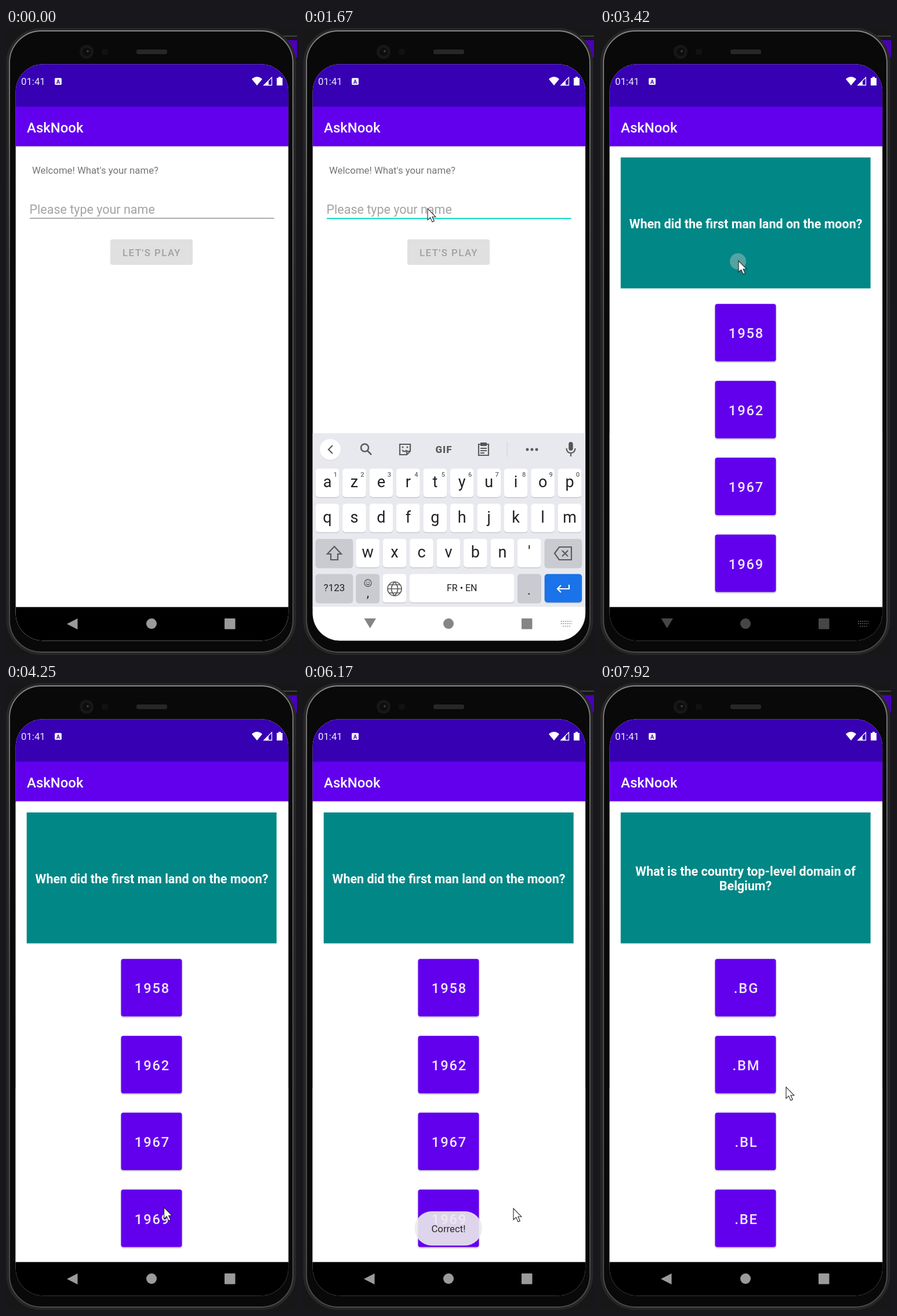
Write an HTML page that moves like this. It is 502 px wide and 1080 px high and loops after 8 s.

```html
<!DOCTYPE html>
<html lang="en">
<head>
<meta charset="utf-8">
<title>Quiz app demo</title>
<style>
  html, body { margin: 0; width: 100%; height: 100%; overflow: hidden; background: #161616; }
  svg { display: block; width: 502px; height: 1080px; font-family: Roboto, sans-serif; }
  .mid { text-anchor: middle; }
  .medium { font-weight: 500; }
  .bold { font-weight: 700; }
  .line { fill: none; stroke: #5c5c5c; stroke-width: 2.2; }
</style>
</head>
<body>
<svg id="stage" viewBox="0 0 502 1080" xmlns="http://www.w3.org/2000/svg"></svg>
<script>
const PURPLE = '#6200ee', TEAL = '#1adcc8', KEY_GRAY = '#cacad1';
const MOON = ['1958', '1962', '1967', '1969'];
const DOMAINS = ['.BG', '.BM', '.BL', '.BE'];
const NAME = 'Wilu', TYPED_AT = [2080, 2250, 2330, 2500];

const rect = (x, y, w, h, fill, rx = 0, more = '') =>
  `<rect x="${x}" y="${y}" width="${w}" height="${h}" rx="${rx}" fill="${fill}" ${more}/>`;
const circle = (x, y, r, fill, more = '') => `<circle cx="${x}" cy="${y}" r="${r}" fill="${fill}" ${more}/>`;
const path = (d, fill, more = '') => `<path d="${d}" fill="${fill}" ${more}/>`;
const line = (d, more = '') => `<path class="line" d="${d}" ${more}/>`;
const text = (x, y, str, size, fill, cls = '', more = '') =>
  `<text x="${x}" y="${y}" font-size="${size}" fill="${fill}" class="${cls}" ${more}>${str}</text>`;
const group = (id, ...parts) => `<g id="${id}">${parts.join('')}</g>`;

function phoneBody() {
  return rect(0, 0, 502, 1080, '#171717') + rect(440, 13, 62, 2, '#444') + rect(470, 21, 32, 30, '#4a00b8') +
    rect(3, 2.5, 495, 1075, '#0a0a0a', 58, 'stroke="#262626" stroke-width="5"') +
    rect(6, 5, 489, 1070, '#090909', 55, 'stroke="url(#rim)" stroke-width="1.8"') +
    circle(139, 41, 12, '#171717') + circle(139, 41, 7, '#0d0d0e') + circle(141, 40, 2, '#3a3a3a') +
    rect(165, 36, 11, 10, '#111', 3) + rect(225, 37, 53, 8, '#272727', 3);
}

function appBars() {
  return rect(16, 62, 472, 74, '#3700b3') +
    text(26, 98.3, '01:41', 16.75, '#f0eaf8') +
    rect(84, 86, 12, 12, '#f0eaf8', 2) + text(90, 95.5, 'A', 9, '#3700b3', 'mid bold') +
    path('M424 88Q433 80 442 88L433 99Z', '#fff') +
    path('M445 98.5L458.5 85V98.5Z', 'none', 'stroke="#fff" stroke-width="1.3"') + path('M445 99L453 91V99Z', '#fff') +
    path('M467 86H470V84H474V86H477V99H467Z', '#fff') +
    rect(16, 135.6, 472, 68.1, PURPLE) + text(36, 180, 'AskNook', 23.9, '#fff', 'medium') +
    rect(16, 203.7, 472, 1.5, '#00000012');
}

function welcomePage() {
  return text(45, 251, "Welcome! What's your name?", 16.75, '#757575') +
    text(40.5, 319.5, 'Please type your name', 21.5, '#a3a3a3', '', 'id="hint"') +
    text(40.5, 319.5, '', 21.5, '#222', '', 'id="typed"') +
    rect(41, 321.5, 0, 1.3, '#333', 0, 'id="composing"') + rect(86, 296, 2.5, 29, TEAL, 0, 'id="caret"') +
    rect(41, 327, 421.5, 1.3, '#858585', 0, 'id="underline"') +
    rect(180, 364, 142, 44, '#e0e0e0', 4, 'id="play"') +
    text(251.5, 392.5, "LET'S PLAY", 16.75, '#a0a0a0', 'mid medium', 'id="playLabel" letter-spacing="1.5"');
}

function keyboard() {
  const key = (x, y, label, w = 40.6, fill = '#fff', size = 27) =>
    rect(x, y + 1.5, w, 49, '#c9cad0', 5) + rect(x, y, w, 49, fill, 5) +
    text(x + w / 2, y + 24.5 + size * .29, label, size, '#202124', 'mid');
  const row = (chars, x, y) => [...chars].map((c, i) => key(x + i * 46.45, y, c)).join('');
  const digits = [...'1234567890'].map((d, i) => text(56 + i * 46.45, 772.5, d, 11, '#666', 'mid medium')).join('');
  const keys = row('azertyuiop', 21.7, 759) + digits + row('qsdfghjklm', 21.7, 819.5) + row("wxcvbn'", 91.3, 880) +
    key(21.7, 880, '', 64.5, KEY_GRAY) + key(416.7, 880, '', 64.5, KEY_GRAY) +
    key(21.7, 940.5, '?123', 64.5, KEY_GRAY, 17) + key(91.3, 940.5, '', 40.6, KEY_GRAY) + key(137.5, 940.5, '') +
    key(184, 940.5, 'FR • EN', 180.5, '#fff', 16) + key(370, 940.5, '', 41, KEY_GRAY) + key(416.7, 940.5, '', 64.5, '#1a73e8') +
    text(390, 976, '.', 22, '#222', 'mid') + text(112, 980, ',', 22, '#222', 'mid');
  const icons = line('M54 893L66 906H60V916H48V906H42Z') +
    line('M434 905L442 894H463V916H442ZM447 900L457 910M457 900L447 910') +
    line('M146 966a12 12 0 1 0 24 0a12 12 0 1 0 -24 0H170M158 954Q147 966 158 978Q169 966 158 954M149 959H167M149 973H167', 'style="stroke-width:1.7"') +
    line('M106 956a6 6 0 1 0 12 0a6 6 0 1 0 -12 0M109 957Q112 961 115 957', 'style="stroke-width:1.3"') +
    circle(110, 954.5, .9, '#555') + circle(114, 954.5, .9, '#555') +
    line('M459 959V966H439M445 960L439 966L445 972', 'style="stroke:#fff"');
  const mic = rect(458.3, 713, 7.4, 15, '#555', 3.7) + line('M454.5 724Q455 732 462 732Q469 732 469.5 724M462 732V738');
  const tools = line('M51 719L44 726L51 733') +
    line('M100 723a6.5 6.5 0 1 0 13 0a6.5 6.5 0 1 0 -13 0M111 728L118 735', 'style="stroke-width:2.6"') +
    line('M167 717H185V729L179 735H167ZM185 729H179V735M171 727Q175 732 179 727') +
    circle(172, 722, 1.5, '#555') + circle(180, 722, 1.5, '#555') +
    text(243, 732, 'GIF', 17, '#5c5c5c', 'mid', 'font-weight="900" letter-spacing="1"') +
    line('M303 717H320V736H303ZM306 724H317M306 728H317M306 732H313') + rect(306, 714, 11, 6, '#555', 1) +
    rect(351.5, 712, 1, 27, '#cfd0d5') + [387, 395, 403].map(x => circle(x, 726, 2.5, '#5c5c5c')).join('');
  const words = [121, 250, 378].map(x => text(x, 734.5, '', 22, '#5a5a5f', 'mid suggestion')).join('') +
    rect(182, 711, 1, 29, '#c4c5ca') + rect(318, 711, 1, 29, '#c4c5ca');
  return rect(16, 698, 472, 301, '#e8e9ee') + circle(47, 727, 18, '#d3d4d9') + circle(47, 726, 18, '#fff') +
    keys + icons + mic + group('tools', tools) + group('words', line('M43 719L50 726L43 733'), words);
}

function quizPage() {
  const answers = MOON.map((_, i) => {
    const y = 475.3 + i * 132.4;
    return rect(198.5, y, 105, 99, PURPLE, 4, 'filter="url(#shadow)"') +
      text(252.5, y + 59, '', 23.7, '#f1e8fd', 'mid medium label', 'letter-spacing="1.9"');
  }).join('');
  return rect(16, 205.5, 472, 792, '#fff') + rect(35.7, 223, 431, 225.5, '#018786') +
    text(251.5, 344.5, 'When did the first man land on the moon?', 21.5, '#fff', 'mid bold', 'id="moon"') +
    group('belgium', text(251, 332, 'What is the country top-level domain of', 21.5, '#fff', 'mid bold'),
      text(251, 357, 'Belgium?', 21.5, '#fff', 'mid bold')) +
    answers + rect(198.5, 872.5, 105, 99, '#fff', 4, 'id="ripple"') +
    group('toast', rect(192.5, 910, 116.5, 59, '#ebebeb', 29.5, 'fill-opacity=".9"'),
      text(251, 946, 'Correct!', 16.75, '#2a2a2a', 'mid'));
}

function navBar() {
  return rect(16, 997.4, 472, 60, '#000') + rect(16, 997, 472, 60, '#fff', 0, 'id="navLight"') +
    group('navIcons', path('M105 1026.5L123.5 1017V1036Z', 'inherit', 'id="back"'),
      path('M105.5 1017H126L115.7 1034Z', 'inherit', 'id="down"'),
      circle(251, 1026, 9, 'inherit'), rect(377, 1017, 18.5, 18.5, 'inherit', 1),
      path('M445 1022H464M445 1026H464M448 1030.5H461', 'none',
        'id="switcher" stroke="#aaa" stroke-width="2" stroke-dasharray="2 1.6"'));
}

const stage = document.getElementById('stage');
stage.innerHTML = `<defs>
  <linearGradient id="rim" x2="0" y2="1"><stop stop-color="#858585"/><stop offset=".45" stop-color="#555"/><stop offset="1" stop-color="#4c4c4c"/></linearGradient>
  <clipPath id="screen"><rect x="16.7" y="62.3" width="470.4" height="993" rx="47"/></clipPath>
  <filter id="shadow" x="-20%" y="-20%" width="140%" height="140%"><feDropShadow dx="0" dy="1.5" stdDeviation="1.2" flood-opacity=".3"/></filter>
</defs>` + phoneBody() + `<g clip-path="url(#screen)">` + rect(16, 62, 472, 994, '#fff') + appBars() +
  group('welcome', welcomePage()) + group('keyboard', keyboard()) + group('quiz', quizPage()) + navBar() +
  circle(0, 0, 14, '#ccc', 'id="touch"') + '</g>' +
  path('M0 0V19.5L4.6 15.4L8 23L11.3 21.5L8 14.2H13.8Z', '#fff', 'id="pointer" stroke="#222" stroke-width="1.1"');

const $ = id => document.getElementById(id);
const set = (id, attrs) => { for (const k in attrs) $(id).setAttribute(k, attrs[k]); };
const show = (id, opacity) => set(id, { opacity: +opacity });
const progress = (t, from, to) => Math.min(1, Math.max(0, (t - from) / (to - from)));
const ease = p => p * p * (3 - 2 * p);
const labels = [...document.querySelectorAll('.label')];
const suggestions = [...document.querySelectorAll('.suggestion')];

const POINTER_PATH = [
  [830, 500, 560], [1150, 215, 311], [1700, 215, 311], [2050, 290, 905], [2830, 290, 965], [3170, 239, 401],
  [3500, 239, 401], [4300, 273, 909], [5700, 273, 909], [6080, 363, 905], [6580, 363, 905],
  [7330, 412, 780], [7500, 412, 765], [7916, 321, 696]
];
const TAPS = [[1160, 215, 311], [3170, 238, 402], [5240, 273, 909]];

function pointerAt(t) {
  let i = POINTER_PATH.findIndex(p => p[0] > t);
  if (i < 0) i = POINTER_PATH.length - 1;
  if (i < 1) i = 1;
  const [t0, x0, y0] = POINTER_PATH[i - 1], [t1, x1, y1] = POINTER_PATH[i];
  const p = ease(progress(t, t0, t1));
  return [x0 + (x1 - x0) * p, y0 + (y1 - y0) * p];
}

function drawForm(t) {
  const count = TYPED_AT.filter(at => t >= at - 1).length;
  const name = NAME.slice(0, count), focused = t >= 1240;
  $('typed').textContent = name;
  const width = count ? $('typed').getComputedTextLength() : 0;
  set('composing', { width });
  set('caret', { x: 40.5 + width });
  show('caret', count && (t < 3000 || t >= 3500));
  show('hint', !count);
  set('underline', focused ? { fill: TEAL, height: 2.2 } : { fill: '#858585', height: 1.3 });
  set('play', {
    fill: !count ? '#e0e0e0' : t >= 3160 ? '#7a2bf1' : PURPLE,
    filter: count ? 'url(#shadow)' : 'none'
  });
  set('playLabel', { fill: count ? '#fff' : '#a0a0a0' });
  show('tools', !count);
  show('words', count);
  const guesses = [name, name.replace('i', 'o'), name.replace('i', 'e')];
  suggestions.forEach((el, i) => el.textContent = count > 1 || i === 0 ? guesses[i] : '');
}

function drawNav(t) {
  const light = progress(t, 1320, 1500) * (1 - progress(t, 3330, 3410));
  const ime = t >= 1400 && t < 3600;
  show('navLight', light);
  show('back', !ime);
  show('down', ime);
  show('switcher', ime);
  set('navIcons', { fill: light > .5 ? '#858585' : '#9b9b9b', opacity: t >= 3400 && t < 3600 ? .45 : 1 });
}

function drawQuiz(t) {
  const second = t >= 7249;
  show('quiz', progress(t, 3230, 3400));
  show('moon', !second);
  show('belgium', second);
  labels.forEach((el, i) => el.textContent = (second ? DOMAINS : MOON)[i]);
  show('ripple', t >= 5240 ? .24 * (1 - progress(t, 5240, 5580)) : 0);
  show('toast', progress(t, 5300, 5580) * (1 - progress(t, 7480, 7700)));
}

function render(t) {
  drawForm(t);
  set('keyboard', { transform: `translate(0 ${301 * (1 - progress(t, 1300, 1570)) ** 2})` });
  drawQuiz(t);
  drawNav(t);
  const [x, y] = pointerAt(t);
  set('pointer', { transform: `translate(${x} ${y})` });
  show('pointer', t >= 830 && !(t >= 2080 && t < 2820));
  const tap = TAPS.find(([at]) => t >= at && t < at + 300);
  if (tap) set('touch', { cx: tap[1], cy: tap[2] });
  show('touch', tap ? .4 : 0);
}

// The screen updates at 12 steps per second.
function tick() {
  const step = Math.floor((performance.now() % 8000) * .012 + .06);
  render(Math.min(step, 95) / .012);
  requestAnimationFrame(tick);
}
tick();
</script>
</body>
</html>
```
